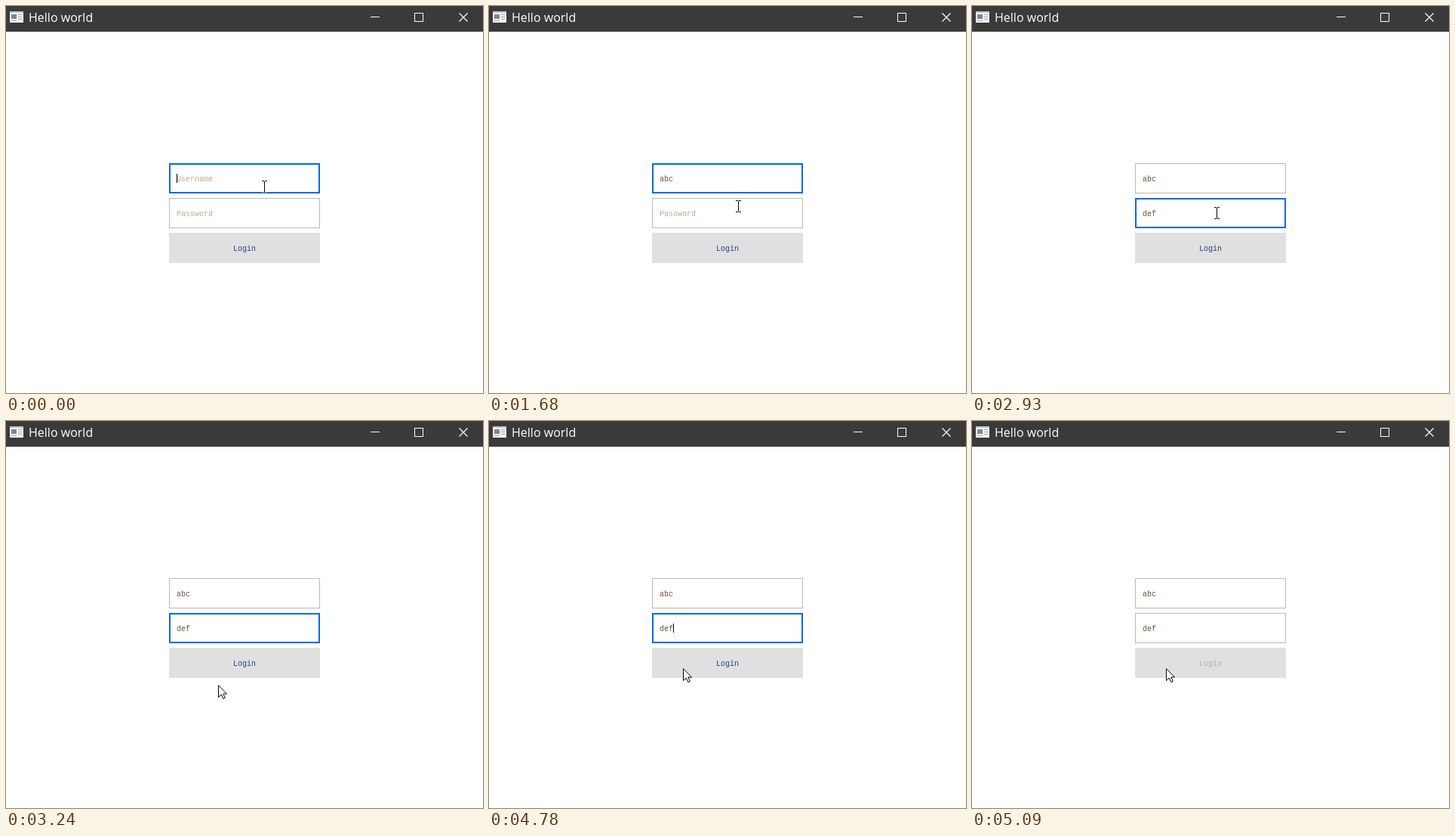
Write an HTML page that moves like this. It is 632 px wide and 512 px high and loops after 7510 ms.

```html
<!DOCTYPE html>
<html lang="en">
<head>
<meta charset="utf-8">
<title>Login window</title>
<style>
  html, body { margin: 0; width: 100%; height: 100%; overflow: hidden; background: #fff; }
  svg { display: block; width: 632px; height: 512px; }
  .title { font: 16px "Open Sans", sans-serif; fill: #fff; }
  .label { font: 10px "Liberation Mono", monospace; }
  .crisp { shape-rendering: crispEdges; }
  #beam { mix-blend-mode: difference; }
</style>
</head>
<body>
<svg viewBox="0 0 632 512">
  <rect width="632" height="512" fill="#fff"/>

  <rect width="632" height="34" fill="#3a3a3a"/>
  <g class="crisp">
    <rect x="5" y="7" width="18" height="15" fill="#f2f2f2"/>
    <rect x="5" y="7" width="18" height="2" fill="#c4c4c4"/>
    <rect x="7" y="11" width="7" height="6" fill="#7488a4"/>
    <path d="M16 11.5h5M16 14.5h5M16 17.5h5M7 19.5h7" stroke="#a8a8a8"/>
  </g>
  <text class="title" x="30" y="21">Hello world</text>
  <g fill="none" stroke="#fff">
    <path class="crisp" d="M483 14.5h12M541.5 9.5h11v11h-11z"/>
    <path d="M600.5 9.5l11 11M611.5 9.5l-11 11" stroke-width="1.2"/>
  </g>

  <g class="crisp" fill="none">
    <rect id="userBox"/>
    <rect id="passBox"/>
    <rect x="216" y="300" width="200" height="40" fill="#e0e0e0"/>
  </g>
  <text class="label" id="userText" x="226" y="232"></text>
  <text class="label" id="passText" x="226" y="278"></text>
  <text class="label" id="login" x="316" y="324" text-anchor="middle">Login</text>
  <rect class="crisp" id="caret" width="1" height="12" fill="#000"/>

  <circle id="halo" r="15" fill="#ff0" fill-opacity=".5"/>
  <path class="crisp" id="beam" d="M-3 -7.5h3M1 -7.5h3M.5 -7v14M-3 7.5h3M1 7.5h3" stroke="#fff" fill="none"/>
  <path id="arrow" d="M.5 .7V16.5L4.3 13L6.8 18.5L9.3 17.4L6.9 12H11.5Z" fill="#fff" stroke="#000"/>
</svg>
<script>
const LOOP = 7510;
const $ = id => document.getElementById(id);

const initial = {
  user: "", pass: "", focus: "user", caret: true,
  at: [342, 239], arrow: false, press: false, enabled: true
};

// Each entry changes part of the state from its time (ms) onward.
const timeline = [
  [440, { caret: false }],
  [520, { user: "a", caret: true }],
  [650, { user: "ab" }],
  [880, { user: "abc" }],
  [1440, { caret: false }],
  [1520, { at: [339, 246] }],
  [1600, { at: [334, 257] }],
  [1680, { at: [330, 265] }],
  [1760, { at: [326, 271] }],
  [1840, { at: [324, 274] }],
  [1910, { press: true }],
  [1980, { focus: "pass", caret: true }],
  [2060, { press: false }],
  [2140, { pass: "d" }],
  [2310, { pass: "de" }],
  [2380, { pass: "def" }],
  [2930, { caret: false }],
  [3010, { at: [320, 283] }],
  [3080, { at: [308, 306], arrow: true }],
  [3160, { at: [293, 333] }],
  [3240, { at: [281, 349] }],
  [3310, { at: [279, 350] }],
  [3390, { at: [277, 347] }],
  [3470, { at: [276, 343], caret: true }],
  [3540, { at: [276, 341] }],
  [3940, { press: true }],
  [4020, { caret: false }],
  [4100, { press: false }],
  [4460, { caret: true }],
  [4630, { at: [270, 337] }],
  [4700, { at: [261, 330] }],
  [4780, { at: [257, 327] }],
  [5010, { press: true, caret: false }],
  [5090, { press: false, focus: "", enabled: false }]
];

const stateAt = time => Object.assign({}, initial,
  ...timeline.filter(([start]) => start <= time).map(([, change]) => change));

function set(id, attributes) {
  for (const name in attributes) $(id).setAttribute(name, attributes[name]);
}

const show = (id, visible) => set(id, { visibility: visible ? "visible" : "hidden" });

function drawField(name, top, value, placeholder, focused) {
  const line = focused ? 2 : 1;
  set(name + "Box", {
    x: 216 + line / 2, y: top + line / 2, width: 200 - line, height: 40 - line,
    stroke: focused ? "#0067f4" : "#b9b9b9", "stroke-width": line
  });
  $(name + "Text").textContent = value || placeholder;
  set(name + "Text", { fill: value ? "#6b5233" : "#b9ab94" });
}

function draw(time) {
  const s = stateAt(time);
  drawField("user", 208, s.user, "Username", s.focus === "user");
  drawField("pass", 254, s.pass, "Password", s.focus === "pass");
  set("login", { fill: s.enabled ? "#1f4482" : "#a5b0bd" });

  show("caret", s.caret);
  if (s.focus) set("caret", { x: 226 + 6 * s[s.focus].length, y: s.focus === "user" ? 222 : 268 });

  const transform = `translate(${s.at})`;
  for (const id of ["halo", "beam", "arrow"]) set(id, { transform });
  show("halo", s.press);
  show("beam", !s.arrow);
  show("arrow", s.arrow);
}

let start;
function tick(now) {
  start ??= now;
  draw((now - start) % LOOP);
  requestAnimationFrame(tick);
}
draw(0);
requestAnimationFrame(tick);
</script>
</body>
</html>
```
